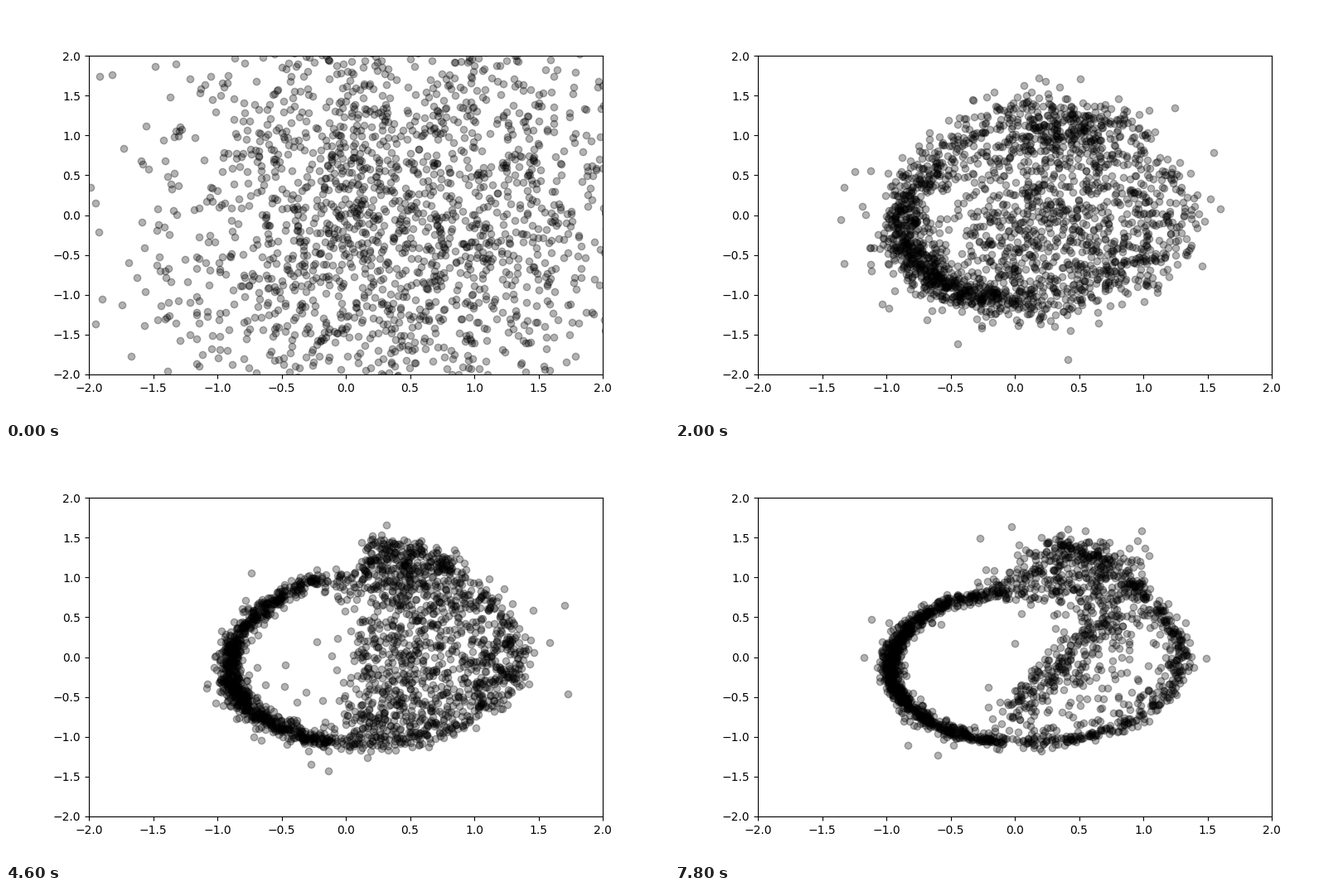
A matplotlib script for the animation above (8 s loop, 800x500 px).

```python
import numpy as np
import matplotlib.pyplot as plt
from matplotlib.animation import FuncAnimation

FRAMES, STEP = 40, 200
FORMED = 6  # frame at which the noise has gathered into a shape


def mix(a, b, t):
    return a + (b - a) * t


def arc(sine, center, rx, ry, lift):
    """Half ellipse by height, its top raised by lift; negative rx opens right."""
    x = center[0] + rx * np.sqrt(1 - sine**2)
    y = center[1] + ry * sine + lift * np.maximum(sine, 0)**3
    return np.column_stack([x, y])


def blur(rng, pts, sd):
    tail = np.exp(.35 * rng.normal(size=(len(pts), 1)))
    return pts + rng.normal(size=pts.shape) * sd * tail


def strays(rng, n):
    ang = rng.uniform(0, 2 * np.pi, n)
    r = rng.uniform(1.25, 1.8, n)
    return np.column_stack([.15 + r * np.cos(ang), r * np.sin(ang)])


def shape(rng, frame):
    p = (frame - FORMED) / (FRAMES - 1 - FORMED)
    early = 1 - (1 - p)**3
    late = p**3

    def draw(start, end, t):
        return rng.random(int(mix(start, end, t)))

    def rim(sine):
        return arc(sine, (.1, 0), 1.2, 1.1, .35)

    # Dense crescent, heavier at its lower left to begin with
    n = int(mix(690, 930, early))
    ang = np.pi * (rng.beta(1.5, mix(2.3, 1.6, early), n) - .5)
    left = arc(np.sin(ang), (0, -.13), -mix(.83, .95, early), .94, mix(.42, 0, p))
    left = blur(rng, left, mix(.13, .036, early))

    ang = np.pi * (.96 * draw(120, 380, p) - .5)
    right = blur(rng, rim(np.sin(ang)), mix(.2, .045, early))

    # Scatter between the right rim and an inner edge that tilts into the band
    fill = rim(2 * draw(1030, 200, late) - 1)
    y = fill[:, 1]
    edge = mix(mix(-.4, .05, early), .43 + .5 * y, late)
    fill[:, 0] = mix(fill[:, 0], edge, rng.random(len(fill)))
    fill = blur(rng, fill, mix(.19, .06, early))

    y = mix(-.75, .9, draw(0, 280, late))
    band = np.column_stack([.45 + .55 * y - .15 * y**2, y])
    band = blur(rng, band, .09)

    a = draw(130, 280, p)
    b = rng.random(len(a))
    cap = np.column_stack([-.25 + .5 * a + .65 * b, .8 + .65 * a - .2 * b])
    cap = blur(rng, cap, .07)

    hole = rng.uniform(-.65, .65, (int(mix(120, 0, early)), 2)) - [.2, 0]
    pts = np.vstack([left, right, fill, band, cap, hole])
    pts += rng.normal(0, .02, 2)
    return np.vstack([pts, strays(rng, int(mix(18, 4, early)))])


def cloud(frame):
    rng = np.random.default_rng(100 + frame)
    pts = shape(rng, max(frame, FORMED))
    wide = rng.normal((.4, 0), (.95, 1.45), pts.shape)
    return mix(wide, pts, min(frame / FORMED, 1))


fig, ax = plt.subplots(figsize=(8, 5), dpi=100)
ax.set_xlim(-2, 2)
ax.set_ylim(-2, 2)
dots, = ax.plot([], [], "ko", alpha=.3)


def update(frame):
    dots.set_data(*cloud(frame).T)
    return dots,


anim = FuncAnimation(fig, update, frames=FRAMES, interval=STEP,
                     init_func=lambda: update(0), repeat=True, repeat_delay=0)
plt.show()
```
